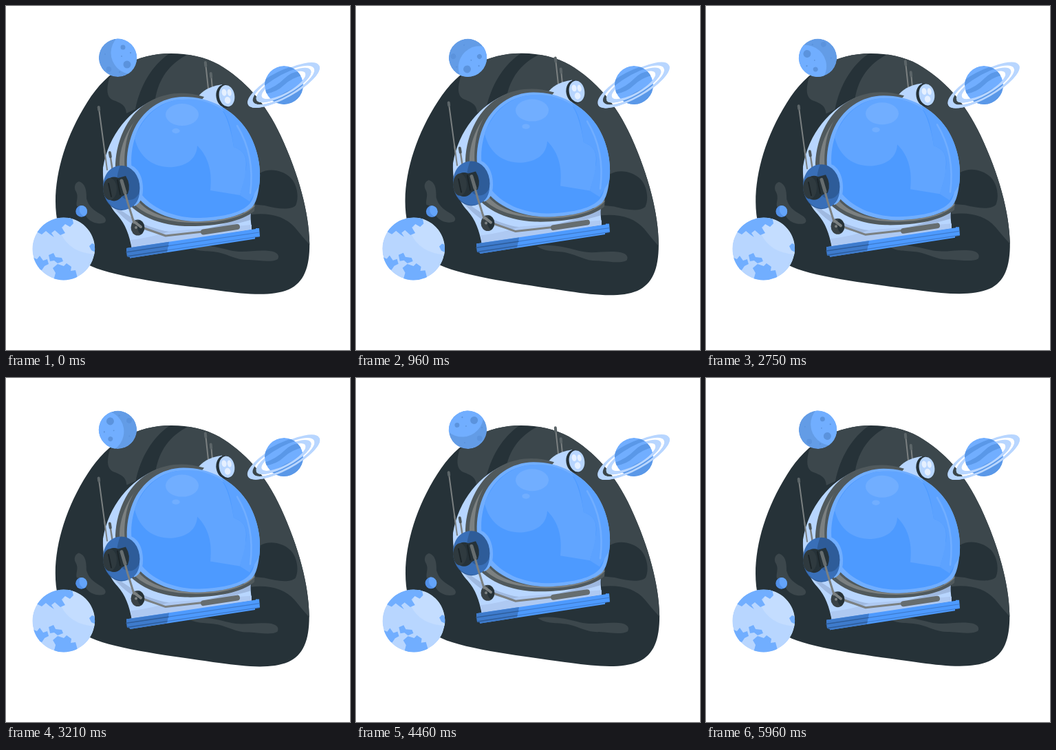
An HTML page that plays this animation: 500x500 px, repeating every 6 s.

```html
<!DOCTYPE html>
<html lang="en">
<head>
<meta charset="utf-8">
<title>Space helmet</title>
<style>
  html, body { margin: 0; width: 100%; height: 100%; overflow: hidden; background: #fff; }
  svg { display: block; width: 100vw; height: 100vh; }
  .main { fill: #4d9aff; }
  .soft { fill: #71aeff; }
  .pale { fill: #b8d6ff; }
  .deep { fill: #3e7bcc; }
  .navy { fill: #2e5c99; }
  .night { fill: #263238; }
  .dusk { fill: #3c474c; }
  .iron { fill: #50595c; }
  .steel { fill: #7b8081; }
  .line { fill: none; stroke-linecap: round; stroke-linejoin: round; }
</style>
</head>
<body>
<svg viewBox="0 0 500 500" xmlns="http://www.w3.org/2000/svg">
  <defs>
    <clipPath id="skyClip"><path id="skyShape" d="M240 69C190 69 148 92 118 140C88 187 72 240 72 284C72 333 92 367 132 381.5C175 397 260 406.5 312 414C350 419 386 422.500 411 412C433 402 441.500 380 441.200 345C440.500 300 425.500 245 399.500 189C377 140 346.500 107 309 85C289 74 265 69 240 69Z"/></clipPath>
    <clipPath id="moonClip"><circle cx="162.5" cy="75.3" r="27.7"/></clipPath>
    <clipPath id="earthClip"><circle cx="83.7" cy="353" r="45.4"/></clipPath>
    <clipPath id="saturnClip"><circle cx="404" cy="115" r="28"/></clipPath>
    <clipPath id="frontClip"><rect x="-70" y="0" width="140" height="70"/></clipPath>
    <clipPath id="visorClip"><path id="visorShape" d="M258 132C296 132 330 150 350 180C366 205 373 238 367 268C365 280 362 288 357 293C340 307 305 313 275 313C240 312 205 299 187 272C173 249 172 215 184 184C197 152 226 132 258 132Z"/></clipPath>
    <g id="rings" class="line" stroke="#b8d6ff">
      <circle r="54.7" stroke-width="8.6"/>
      <circle r="40.5" stroke-width="9"/>
    </g>
  </defs>

  <g id="sky">
    <use href="#skyShape" class="night"/>
    <g clip-path="url(#skyClip)" class="dusk">
      <path d="M150 105C146 120 146 131 154 136C166 141 174 143 175 156L188 150C195 115 213 85 239 68L180 60Z"/>
      <path d="M265 70C237 84 222 106 217 135L300 230L369 243C382 235 402 238 414 250C424 261 426 279 421 290C412 298 392 294 376 290L356 288L357 303C384 300 406 306 420 322Q432 337 445 351L470 300L400 100L300 60Z"/>
      <path d="M106 255C115 258 117 266 117 280C120 291 126 296 138 303C145 307 147 312 143 315C135 318 124 315 118 308C113 301 112 292 103 291C101 285 106 278 102 270C98 264 100 257 106 255Z"/>
      <path d="M264 349C285 345 305 350 325 355C345 360 361 354 382 356C395 357 398 363 395 368C387 373 370 370 354 369C336 370 326 362 308 358C290 355 278 358 264 349Z"/>
    </g>
  </g>

  <g id="moon" clip-path="url(#moonClip)">
    <circle cx="162.5" cy="75.3" r="27.7" fill="#639ce6"/>
    <circle cx="183.500" cy="68" r="31" class="soft"/>
    <g fill="#5b93dd">
      <circle cx="170" cy="60" r="3.5"/>
      <circle cx="176" cy="85" r="5.5"/>
      <circle cx="149.4" cy="92" r="3.9"/>
      <circle cx="181" cy="68" r="1.1"/>
      <circle cx="165" cy="96" r="1.2"/>
      <circle cx="144" cy="70" r="1"/>
      <circle cx="168" cy="73" r=".9"/>
    </g>
  </g>

  <g id="saturn">
    <use href="#rings" transform="translate(403.5 115) rotate(-29) scale(1 .317)"/>
    <g clip-path="url(#saturnClip)">
      <circle cx="404" cy="115" r="28" class="soft"/>
      <g transform="translate(404 115) rotate(-29)" fill="#5a98e8">
        <path d="M-30 -18Q-8 -25 30 -17V-12Q2 -18 -30 -12Z"/>
        <path d="M-30 -7Q-12 -3 5 -8T32 -4V1Q14 -4 0 0T-30 -2Z"/>
        <path d="M-30 12Q0 7 30 14V30H-30Z"/>
      </g>
    </g>
    <g transform="translate(403.5 115) rotate(-29) scale(1 .317)" clip-path="url(#frontClip)">
      <use href="#rings"/>
    </g>
  </g>

  <g id="earth">
    <g clip-path="url(#earthClip)">
      <circle cx="83.7" cy="353" r="45.4" class="pale"/>
      <path d="M80 331Q93 359 130 361V300H92Z" fill="#c4ddff"/>
      <g class="soft">
        <path d="M44 328L52 332 58 327 64 332 70 336 66 330 71 326 79 333 86 330 81 322 86 317 93 321 98 316 96 306 60 306Z"/>
        <path d="M38 365L45 368 49 363 54 370 60 368 62 375 56 378 52 384 46 382 40 382Z"/>
        <path d="M62 362L69 359 72 365 81 366 83 371 75 374 70 370 64 371Z"/>
        <path d="M69 399L72 388 68 381 75 375 84 378 88 374 95 379 94 385 101 384 105 399Z"/>
        <path d="M121 349L125 345 130 347V358L124 355Z"/>
      </g>
    </g>
    <circle cx="109.7" cy="298.4" r="8.4" fill="#5290e8"/>
    <path d="M108 290.2A8.4 8.4 0 0 1 114 305.6C107 303 105 296 108 290.2Z" fill="#64a4fa"/>
  </g>

  <g id="helmet">
    <g class="line" stroke="#7b8081">
      <path d="M135 149L147 238M151 215L155 240" stroke-width="2"/>
      <path d="M290 83L294 120M298 99L300 120" stroke-width="2"/>
      <path d="M134.7 147L135.2 151M150.8 213L151.8 219M289.8 82L290.3 87M297.7 98L298.2 103" stroke="#5c6568" stroke-width="4"/>
    </g>

    <path d="M278 134C284 123 296 117 314 114L322 146L295 150Z" class="pale"/>
    <g transform="rotate(-10 319 131)">
      <ellipse cx="318.500" cy="131" rx="13" ry="17" class="night"/>
      <ellipse cx="321" cy="131" rx="11.2" ry="15.8" class="pale"/>
      <g fill="#e5f0ff">
        <ellipse cx="318" cy="125.5" rx="3.5" ry="5"/>
        <ellipse cx="325.5" cy="127" rx="3" ry="5"/>
        <ellipse cx="321" cy="137.5" rx="4.3" ry="5"/>
      </g>
    </g>

    <path d="M220 134C180 150 149 187 141 235C140 265 148 289 162 304C174 318 179 332 183 353L357 325L354 292L250 220Z" class="pale"/>
    <path d="M151 287C179 303 191 318 231 327C276 333 324 316 356 301L355 311C315 322 280 334 238 332C196 330 176 316 151 287Z" fill="#9fb9e0"/>
    <path d="M181 340Q214 336 239 327L282 324 357 318V325L183 353Z" fill="#aec9f2"/>
    <path d="M151 214L155 240" class="line" stroke="#7b8081" stroke-width="2.5"/>
    <path d="M150.800 213L151.800 219" class="line" stroke="#50595c" stroke-width="4"/>
    <path d="M143 208L147 238" class="line" stroke="#7b8081" stroke-width="2"/>

    <path d="M288 132C246 119 205 131 181 164C160 193 152 238 166 269C180 300 216 318 260 320C302 321 342 314 361 298L362 287L300 290L250 180Z" class="iron"/>
    <path d="M222 138C190 153 167 190 165 227C164 254 172 275 187 289C211 312 258 318 301 314C332 310 352 302 362 290L280 280L220 220Z" class="steel"/>
    <path d="M250 129C211 131 184 158 175 197C167 239 176 271 201 292C229 314 290 321 346 301L260 200Z" class="iron"/>

    <use href="#visorShape" class="soft"/>
    <g clip-path="url(#visorClip)">
      <path d="M258 136C295 136 326 153 345 182C360 207 367 236 362 266C360 280 357 286 349 292C335 303 304 308 276 308C242 307 211 294 194 270C180 247 178 215 190 184C202 155 228 136 258 136Z" class="main"/>
      <path d="M187 192C194 223 218 236 243 234C263 232 277 222 278 203C295 220 300 242 297 268L340 275C344 260 349 250 348 239C351 221 347 210 331 205C328 185 322 160 312 149C294 138 274 134 255 136C225 138 200 158 187 192Z" fill="#61a5ff"/>
      <path d="M312 147C326 164 328 185 331 205C348 210 352 224 348 240C347 254 342 264 340 275L354 284L370 258C373 210 352 166 312 147Z" fill="#5ca2ff"/>
      <path d="M336 174C353 202 360 235 355 272" class="line" stroke="#71aeff" stroke-width="2.5"/>
      <ellipse cx="256" cy="158" rx="24" ry="16" class="soft"/>
      <ellipse cx="247" cy="181.5" rx="5.7" ry="3.7" class="soft"/>
    </g>

    <path d="M180 231C193 235 199 250 199 266C199 280 194 288 186 291L178 263Z" class="soft"/>
    <ellipse cx="168" cy="264.5" rx="26.5" ry="32.5" class="navy"/>
    <path d="M166 232C147 233 138 253 142 272C147 290 162 300 179 294C190 290 194 279 194 270C189 286 170 286 164 270C159 254 162 242 166 232Z" fill="#396fb8"/>
    <path d="M163 250L174 247Q182 260 177 273L165 278Z" class="night"/>
    <ellipse cx="157" cy="266" rx="14.500" ry="17.500" class="night"/>
    <ellipse cx="151" cy="266" rx="10" ry="16" fill="#2f3a3f"/>
    <path d="M149 258L153 277M162 253L166 274" class="line" stroke="#1c2529" stroke-width="2"/>

    <path d="M187 314L198 322 232 334 286 328" class="line" stroke="#7b8081" stroke-width="3"/>
    <path d="M287 328.5L336 321" class="line" stroke="#666d6f" stroke-width="8"/>
    <ellipse cx="191.5" cy="322" rx="10" ry="11.5" fill="#394246"/>
    <path d="M193 311C202 314 204 326 196 332Q188 325 193 311Z" class="night"/>
    <path d="M168 254L177 286 186 315" class="line" stroke="#7b8081" stroke-width="3"/>
    <path d="M168 254L173 271" class="line" stroke="#666d6f" stroke-width="5"/>
    <path d="M187 314L196 321" class="line" stroke="#7b8081" stroke-width="4"/>
    <circle cx="189" cy="322" r="2" class="steel"/>

    <path d="M175 352L363 324V323L368 323L369 335L362 336V338.500L180 366.500V365L176 364Z" class="main"/>
    <path d="M175 352L237 342.800L234 358L180 366.500V365L176 364Z" class="deep"/>
    <path d="M236 348.600L368 329M234 355L368 335" class="line" stroke="#3e7bcc" stroke-width="1.2"/>
    <path d="M175 357.700L236 348.600M177 363.700L234 355" class="line" stroke="#2e5c99" stroke-width="1.4"/>
  </g>
</svg>
<script>
  const LOOP = 6000;
  const part = id => document.getElementById(id);
  const [sky, moon, saturn, earth, helmet] = ['sky', 'moon', 'saturn', 'earth', 'helmet'].map(part);

  // Linear sway: 0, +1 at a quarter, -1 at three quarters, back to 0.
  function sway(time, period) {
    const p = time % period / period;
    return p < .25 ? 4 * p : p < .75 ? 2 - 4 * p : 4 * p - 4;
  }

  // Linear rise and fall, 0 to 1 and back.
  function bob(time, period) {
    return 1 - Math.abs(1 - 2 * (time % period) / period);
  }

  function turn(el, degrees, x, y) {
    el.setAttribute('transform', `rotate(${degrees} ${x} ${y})`);
  }

  function draw(time) {
    turn(sky, sway(time, 3000), 256.5, 244);
    turn(saturn, sway(time, 1500), 403.5, 115);
    turn(earth, sway(time, 6000), 83.7, 344);
    turn(moon, 360 * time / LOOP, 162.5, 75.3);
    helmet.setAttribute('transform', `translate(0 ${-10 * bob(time, 3000)})`);
  }

  const start = performance.now();
  function frame() {
    draw((performance.now() - start) % LOOP);
    requestAnimationFrame(frame);
  }
  draw(0);
  requestAnimationFrame(frame);
</script>
</body>
</html>
```
